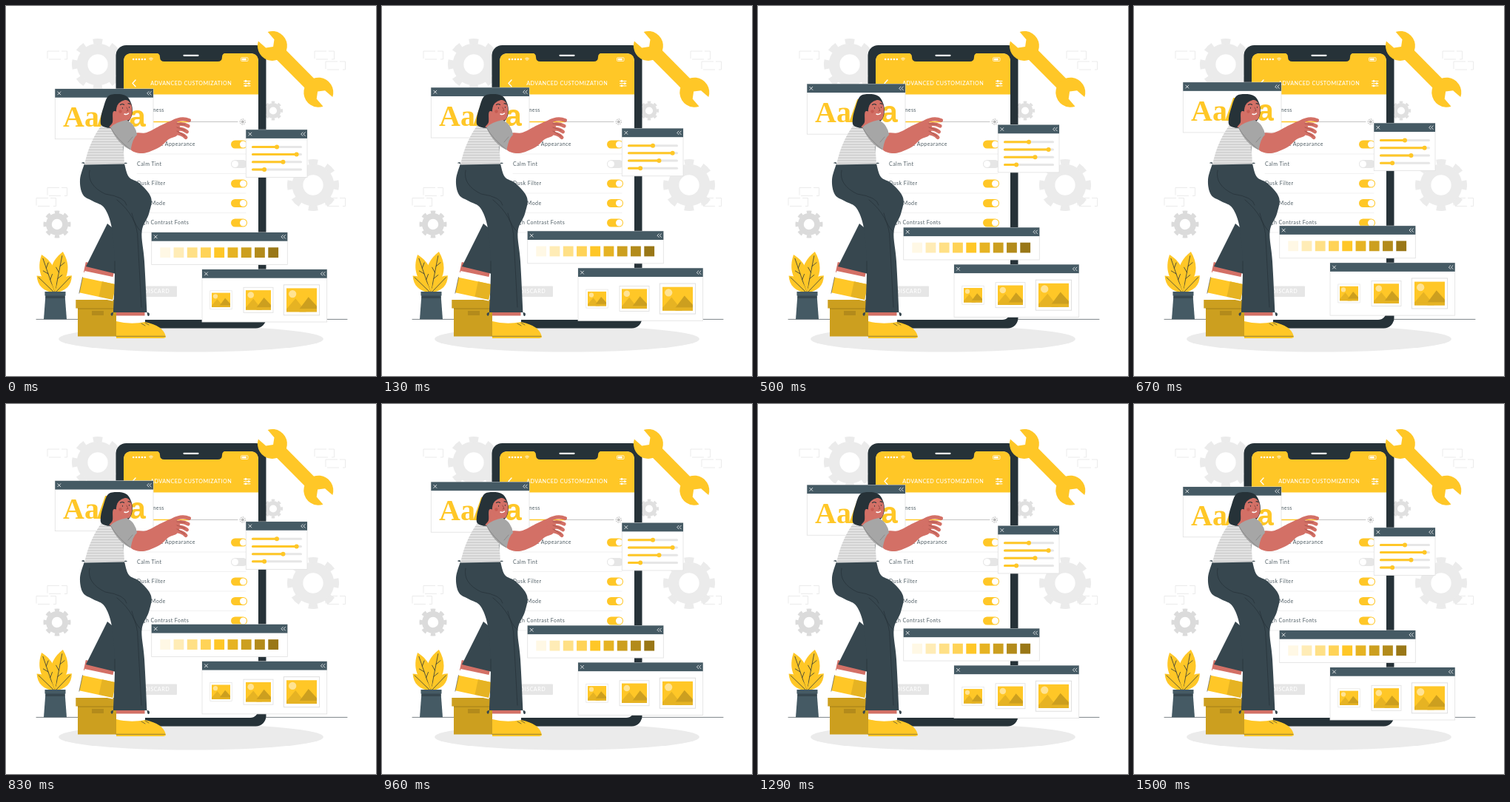
Animation of 500x500 px, one loop 1540 ms. Source, as an HTML page:

```html
<!DOCTYPE html>
<html lang="en">
<head>
<meta charset="utf-8">
<title>Advanced customization</title>
<style>
  html, body { margin: 0; width: 100%; height: 100%; overflow: hidden; background: #fff; }
  svg { display: block; width: 100vw; height: 100vh; }
  text { font-family: Lato, sans-serif; }
  .label { font-size: 7px; letter-spacing: .45px; fill: #4f5d64; }
  .caps { font-size: 7.2px; letter-spacing: .45px; font-weight: 500; fill: #fff; text-anchor: middle; }
  .line { fill: none; stroke-linecap: round; stroke-linejoin: round; }
</style>
</head>
<body>
<script>
const YELLOW = '#ffc727', DARK = '#263238', SLATE = '#37474f', BAR = '#455a64';
const SKIN = '#d37066', BLUSH = '#8e433d', PALE = '#ebebeb', GREY = '#e0e0e0';

const mix = (tone, percent) => `color-mix(in srgb, ${YELLOW}, ${tone} ${percent}%)`;
const AMBER = mix('black', 10), GOLD = mix('black', 20), BRONZE = mix('black', 30);

const repeat = (n, draw) => Array.from({ length: n }, (_, i) => draw(i)).join('');
const rect = (x, y, w, h, fill, extra = '') =>
  `<rect x="${x}" y="${y}" width="${w}" height="${h}" fill="${fill}" ${extra}/>`;
const circle = (x, y, r, fill, extra = '') =>
  `<circle cx="${x}" cy="${y}" r="${r}" fill="${fill}" ${extra}/>`;
const shape = (d, fill) => `<path d="${d}" fill="${fill}"/>`;
const line = (d, stroke, width = 1) =>
  `<path class="line" d="${d}" stroke="${stroke}" stroke-width="${width}"/>`;

// Closed smooth curve through "x,y" points; a doubled point makes a corner.
function blob(points, fill) {
  const p = points.split(' ').map(s => s.split(',').map(Number));
  const at = i => p[(i + p.length) % p.length];
  const handle = (i, side) => at(i).map((v, k) => v + side * (at(i + 1)[k] - at(i - 1)[k]) / 6);
  return shape(`M${p[0]}` + repeat(p.length, i => `C${handle(i, 1)} ${handle(i + 1, -1)} ${at(i + 1)}`), fill);
}

const gear = (x, y, r, color) =>
  circle(x, y, r * .6, 'none', `stroke="${color}" stroke-width="${r * .42}"`) +
  circle(x, y, r * .89, 'none', `stroke="${color}" stroke-width="${r * .22}"
    pathLength="16" stroke-dasharray="1" stroke-dashoffset=".5"`);

// Two staggered dashed outlines
const bricks = (x, y, shift) => repeat(2, i =>
  rect(x + i * shift, y + i * 14, 26.5, 11, 'none', 'stroke="#e6e6e6" stroke-width=".8" stroke-dasharray="16 3 22 5"'));

const panel = (x, y, w, h, content) =>
  rect(x, y, w, h, '#fff', `stroke="${GREY}" stroke-width=".8"`) +
  rect(x, y, w, 11.7, BAR) +
  line(`M${x + 3.5} ${y + 3.9}l4 4m0-4l-4 4`, '#fff', .8) +
  line(`M${x + w - 6} ${y + 3.6}l-2.3 2.3 2.3 2.3m3.2-4.6l-2.3 2.3 2.3 2.3`, '#fff', .8) +
  content;

const slider = (value, i) => {
  const y = 190.4 + i * 10.2, x = 333.5 + value * 65;
  return line(`M333.5 ${y}h65`, '#e6e6e6', 3) + line(`M333.5 ${y}H${x}`, YELLOW, 3) + circle(x, y, 3, YELLOW);
};

const picture = (x, width) => `<g transform="translate(${x} 397.3) scale(${width / 40})">
  ${rect(-23.5, -20, 47, 40, '#fff', `stroke="${GREY}"`)}
  ${rect(-20, -15.5, 40, 31, YELLOW)}
  ${shape('M-20 12L-8-2 6 15.5H-20Z', AMBER)}${shape('M-3 12L9-4 20 8V15.5H-3Z', GOLD)}
  ${rect(-20, 11.5, 40, 4, AMBER)}${circle(-12, -8, 5, mix('white', 50))}</g>`;

const row = (text, i) => {
  const y = 187 + i * 26.5, on = i !== 1;
  return `<text class="label" x="177" y="${y + 2.4}">${text}</text>` +
    rect(304, y - 5.5, 22, 11, on ? YELLOW : '#e6e6e6', 'rx="5.5"') +
    circle(on ? 320.5 : 309.5, y, 4.5, '#fff') +
    line(`M177 ${y + 13}H324`, '#e8e8e8', .6);
};

const backdrop = () =>
  bricks(56, 61, 0).replace(/<rect[^>]*>$/, '') + bricks(417, 61, 15) + bricks(56, 245.5, -15) +
  rect(432, 259.5, 26.5, 11, 'none', 'stroke="#e6e6e6" stroke-width=".8" stroke-dasharray="16 3 22 5"') +
  gear(124, 79, 35, PALE) + gear(415, 242, 35, PALE) +
  gear(361, 141.5, 13, GREY) + gear(69, 295, 18.5, '#dbdbdb') +
  `<ellipse cx="250" cy="450" rx="179" ry="17.5" fill="${PALE}"/>` +
  line('M41 423.4H461', DARK, .6);

const header = () =>
  shape('M159 119.5V75Q159 64 170 64H330Q341 64 341 75V119.5Z', YELLOW) +
  shape('M203 63.5Q208 64 208 69 208 75 214 75H286Q292 75 292 69 292 64 297 63.5Z', DARK) +
  line('M240.5 66.8h19', '#fff', 2.2) +
  repeat(5, i => circle(172.2 + i * 3.9, 72, 1.3, '#fff')) +
  line('M193.5 71q2.5-2.2 5 0m-4 1.3q1.5-1.2 3 0m-1.5 1.2v.1', '#fff', .8) +
  rect(317.5, 69.7, 9.5, 4.8, 'none', 'rx="1" stroke="#fff" stroke-width=".7"') +
  rect(318.7, 70.8, 6, 2.6, '#fff') +
  line('M175 100l-4 4.4 4 4.4', '#fff', 1.4) +
  '<text class="caps" x="250.2" y="107.2">ADVANCED CUSTOMIZATION</text>' +
  repeat(3, i => line(`M321.5 ${101.5 + i * 3.2}h8.5`, '#fff') +
    circle(324 + i % 2 * 4, 101.5 + i * 3.2, 1.4, '#fff'));

const phone = () =>
  rect(148.5, 53, 203, 382.5, DARK, 'rx="14"') + rect(159, 64, 182, 360, '#fff', 'rx="11"') + header() +
  '<text class="label" x="177" y="142.8">Brightness</text>' +
  line('M248 156.5h65', '#b5b5b5', .8) + line('M177 156.5h70', YELLOW, 1.7) +
  circle(319.8, 156.5, 2, '#bbb') +
  circle(319.8, 156.5, 3.6, 'none', 'stroke="#999" pathLength="16" stroke-dasharray="1"') +
  ['Automatic Appearance', 'Calm Tint', 'Dusk Filter', 'Dark Mode', 'High Contrast Fonts'].map(row).join('') +
  rect(177, 378.5, 54, 14.5, '#e6e6e6', 'rx="1"') +
  '<text class="caps" x="204" y="388.4">DISCARD</text>';

const swatch = i =>
  rect(208.3 + i * 18.25, 326.3, 13.8, 13.8, i < 4 ? mix('white', (4 - i) * 22) : mix('black', (i - 4) * 10));

const glyphs = (text, x, family, size = 40) =>
  `<text x="${x}" y="163.5" fill="${YELLOW}" font-size="${size}" font-weight="700" style="font-family:${family}">${text}</text>`;

const panels = () =>
  panel(66.3, 112, 132.7, 67.8, glyphs('Aa', 77, "'Liberation Serif',serif") +
    glyphs('A', 122, "'Liberation Sans',sans-serif", 44) + glyphs('a', 166.5, "'Liberation Sans',sans-serif")) +
  panel(324.3, 167.2, 82.7, 64.3, [.5, .91, .63, .24].map(slider).join('')) +
  panel(196.7, 306, 183.6, 43.6, repeat(9, swatch)) +
  panel(265, 356, 168.7, 71, picture(290.5, 25) + picture(341, 34) + picture(399.5, 41));

function leaf(length, angle, width) {
  const ribs = repeat(3, i => `M0 ${-length * (.35 + i * .15)}l${i % 2 ? -5 : 5}-6`);
  return `<g transform="translate(66 388) rotate(${angle})">
    ${shape(`M0 0C${-width} ${-length * .4} ${-width} ${-length * .7} 0 ${-length}
      ${width} ${-length * .7} ${width} ${-length * .4} 0 0Z`, YELLOW)}
    ${line(`M0 0V${-length * .9}` + (width > 12 ? ribs : ''), DARK, .7)}</g>`;
}

const plant = () =>
  leaf(57, 11, 15) + leaf(55, -19, 13) + leaf(34, -46, 9) + leaf(33, 44, 9) +
  shape('M53.5 390h26L82 423.3H51Z', BAR) + rect(53.5, 391, 26, 4, SLATE) + rect(52.5, 386, 28, 5.5, BAR);

const box = () =>
  rect(97, 397, 52, 49.5, GOLD) + rect(94.3, 397, 54.5, 11.5, GOLD) +
  rect(97, 408.3, 52, 1.6, BRONZE) + rect(116, 412, 16, 6, BRONZE);

const raisedFoot = () => `<g transform="translate(107 350) rotate(12)">
  ${rect(0, -4, 40, 14, SKIN)}${rect(1, 8, 40, 11, '#fff')}
  ${rect(0, 17, 46, 22, YELLOW)}${rect(27, 17, 19, 22, AMBER)}
  ${line('M0 39h46', '#fff', 1.6)}${line('M0 17v22', DARK, .5)}</g>`;

const legs = () =>
  raisedFoot() + shape('M137 294L108 352 147 361.5 156 310Z', SLATE) +
  rect(149, 410, 38.5, 11, SKIN) + rect(149, 418.5, 39, 11, '#fff') +
  shape('M149 426Q168 431 188 427 213 432 216 447 216 449 210 449H149Z', YELLOW) +
  line('M149 446.3H215', DARK, .5) + line('M183 429l5 3m0-4l5 3', DARK, .6) +
  blob('106,213 106,213 100,235 104,255 118,264 133,273 143,300 147,350 145,414 145,414 190.5,414 ' +
    '190.5,414 187,345 183.5,305 193,281 196,259 181,240 166,231 160,213 160,213', SLATE) +
  line('M147 345v16M113 222Q109 242 134 254 161 258 163 269M183 305Q174 298 170 280' +
    'M150 262Q178 285 178 315L183 407', DARK, .7);

const torso = () => {
  const body = 'M132 157Q113 181 106 214.5L160 213.5 158.5 190 172 160 157 154Z';
  return `<clipPath id="shirt"><path d="${body}"/></clipPath>` + shape(body, '#e3e3e3') +
    `<g clip-path="url(#shirt)">${line(repeat(15, i => `M100 ${162 + i * 3.6}h72`), '#bdbdbd', .8)}</g>`;
};

const arm = () =>
  blob('168,193 174,173 190,171 210,161 226,155 235,163 231,175 220,180 207,191 185,199', SKIN) +
  repeat(4, i => line(`M225 ${157 + i * 5}Q237 ${150 + i * 7} ${247.5 - i * 1.5} ${154.5 + i * 7.7}`, SKIN, 5)) +
  repeat(3, i => line(`M231 ${159 + i * 5}l11 ${1 + i * 3}`, BLUSH, .6)) +
  shape('M141 164Q148 157 163 154 175 160 177 174 171 179 168.5 194.5 151 187 141 164Z', '#a6a6a6') +
  line('M141 164Q149 179 168 194M165 184l6-7', '#777', .6);

const head = () =>
  blob('132,136 138,122 150,119 163,122 170,134 170,148 163,158 146,165 130,162 128,152', DARK) +
  blob('146,142 144,157 140,164 155,163 164,153', SKIN) +
  blob('149,143 152,132 162,127 169,133 170,145 166,154 155,152', SKIN) +
  line('M154.5 133.5q3-2 5 0M165 132q2-1 3 1M157.5 137.5v.6M166.5 136.5v.6', DARK, 1.1) +
  line('M163 137l2 4.5-2 .5', BLUSH, .8) + line('M160 146q3 1.5 5.5-1', '#fff', 1.4) +
  circle(154.5, 142.5, 2.2, '#c65b52');

const jaw = shape('M-18-9A20 20 0 1 1-18 9L-4.5 8 1.5 0-4.5-8Z', YELLOW);
const wrench = () => `<g transform="translate(360 54) rotate(45.2)">
  ${jaw}${rect(14, -9, 60, 18, YELLOW)}
  <g transform="translate(88.3 0) rotate(180)">${jaw}</g></g>`;

document.body.innerHTML = `<svg viewBox="0 0 500 500">
  ${backdrop()}${phone()}<g id="float">${panels()}</g>
  ${plant()}${box()}${legs()}${torso()}${head()}${arm()}${wrench()}</svg>`;

const LOOP = 1540, PEAK = 720, REST = 1500, RISE = 9.5;
const floating = document.getElementById('float');

function draw() {
  const t = performance.now() % LOOP;
  const lift = t < PEAK ? t / PEAK : Math.max(0, (REST - t) / (REST - PEAK));
  floating.setAttribute('transform', `translate(0 ${-RISE * lift})`);
  requestAnimationFrame(draw);
}
draw();
</script>
</body>
</html>
```
